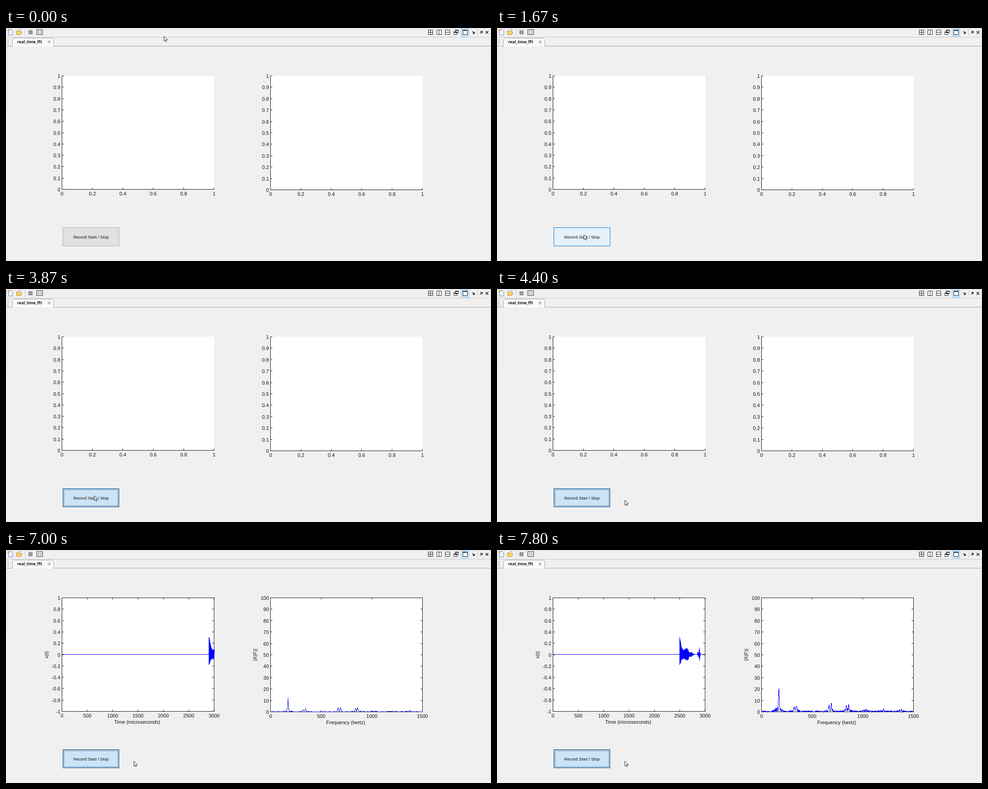
Write an HTML page that moves like this. It is 1079 px wide and 519 px high and loops after 8 s.

```html
<!DOCTYPE html>
<html lang="en">
<head>
<meta charset="utf-8">
<title>real_time_fft</title>
<style>
html, body { margin: 0; width: 100%; height: 100%; overflow: hidden; background: #f0f0f0; }
svg { display: block; width: 100%; height: 100%; }
text { font: 11px "Liberation Sans", Arial, sans-serif; fill: #111; }
.crisp { shape-rendering: crispEdges; }
.line { fill: none; stroke: #111; }
.plot { fill: none; stroke: #00f; shape-rendering: crispEdges; }
</style>
</head>
<body>
<svg id="stage" viewBox="0 0 1079 519">
  <defs>
    <path id="pane" d="M0 0h10v10h-10z"/>
    <path id="arrow" d="M-2.5 -2.5L2 2M2.2 -1.8V2.2H-1.8"/>
    <path id="cross" d="M-3 -3L3 3M3 -3L-3 3"/>
    <rect id="face" x="126.5" y="444.5" width="125" height="41"/>
  </defs>
  <rect width="1079" height="519" fill="#f0f0f0"/>
  <g class="crisp" fill="none">
    <path d="M0 .5H1079M.5 0V191M1078.5 0V519" stroke="#dcdcdc"/>
    <path d="M0 20.5H1079" stroke="#c4c4c4"/>
    <path d="M0 40.5H1079" stroke="#a0a0a0"/>
    <path d="M42.5 2V18M1049.5 2V18M3.5 24V38M5.5 24V38" stroke="#c8c8c8"/>
  </g>
  <path d="M14.5 41V26L18 22.5H102L106 26V41" fill="#fafafa" stroke="#a0a0a0"/>
  <text x="25" y="34" style="font:bold 8.8px 'Open Sans',sans-serif">real_time_fft</text>
  <use href="#cross" x="96" y="31" stroke="#b4b4b4" stroke-width="2"/>

  <path d="M5.5 3.5H12L15 6.5V15.5H5.5Z" fill="#eef6ff" stroke="#5f86b5"/>
  <circle cx="5.5" cy="4.5" r="2.3" fill="#eda23c"/>
  <path d="M23.5 14.5V6H28L29.5 7.5H33V9H35.5L33 14.5Z" fill="#f7d56b" stroke="#b88a2c"/>
  <path d="M29 4.5Q32 1.5 34.5 4.5" fill="none" stroke="#5079b0"/>
  <g class="crisp">
    <rect x="50.5" y="5.5" width="8" height="8" fill="#9c9c9c" stroke="#858585"/>
    <rect x="68.5" y="3.5" width="13" height="11" fill="#fff" stroke="#222"/>
    <rect x="71.5" y="6.5" width="7" height="5" fill="#f4f4f4" stroke="#777"/>
    <rect x="1012.5" y=".5" width="17" height="18" fill="#c6e3fa" stroke="#9accf3"/>
    <g stroke="#222" fill="#fff">
      <use href="#pane" x="939.5" y="4.5"/>
      <use href="#pane" x="958.5" y="4.5"/>
      <use href="#pane" x="977.5" y="4.5"/>
      <path d="M944.5 4.5v10M939.5 9.5h10M963.5 4.5v10M977.5 9.5h10"/>
      <path d="M999.5 4.5h7v6h-7zm0 1h7M996.5 8.5h7v6h-7zm0 1h7"/>
      <use href="#pane" x="1016.5" y="4.5"/>
      <path d="M1016 5.5h11"/>
    </g>
  </g>
  <g fill="none" stroke="#222" stroke-width="1.5">
    <use href="#arrow" transform="translate(1040 10)"/>
    <use href="#arrow" transform="translate(1057.3 9.7) rotate(-90)"/>
    <use href="#cross" x="1070" y="9.7"/>
  </g>

  <g id="empty"></g>
  <g id="live"></g>
  <path id="wave" class="plot"/>
  <path id="spectrum" class="plot"/>

  <g class="crisp">
    <use href="#face" fill="#e1e1e1" stroke="#adadad"/>
    <use href="#face" id="hover" fill="#e5f1fb" stroke="#0078d7"/>
    <g id="press" fill="none">
      <use href="#face" fill="#cce4f7" stroke="#3a72a4"/>
      <rect x="127.5" y="445.5" width="123" height="39" stroke="#5f97c8"/>
      <rect x="129.5" y="447.5" width="119" height="35" stroke="#555" stroke-dasharray="1 1"/>
    </g>
  </g>
  <text x="189" y="469.3" text-anchor="middle" style="font-size:9.25px">Record Start / Stop</text>
  <path id="cursor" d="M.5 .5V11.2L3 8.9L4.7 12.7L6.4 12L4.7 8.3H8.2Z" fill="#fff" stroke="#111" stroke-width=".9"/>
</svg>
<script>
const $ = id => document.getElementById(id);
const LOOP = 8000, STEP = 1000 / 15;
const LEFT = { x: 124.5, y: 106.5, w: 338.5, h: 253 };
const RIGHT = { x: 588.5, y: 106.5, w: 338, h: 254 };
const ZERO = 232.5;

const clamp = v => Math.max(0, Math.min(1, v));
const mix = (a, b, p) => a + (b - a) * p;
const ease = p => p * p * (3 - 2 * p);
const bell = (x, center, width) => Math.exp(-(((x - center) / width) ** 2));
const fall = (x, edge, width) => 1 / (1 + Math.exp((x - edge) / width));
const rand = (i, seed) => {
  const v = Math.sin(i * 127.1 + seed * 311.7) * 43758.5453;
  return v - Math.floor(v);
};
const range = (from, to, step) =>
  Array.from({ length: Math.round((to - from) / step) + 1 }, (_, i) => +(from + i * step).toFixed(1));

function axes({ x, y, w, h }, xs, ys, boxed) {
  const bottom = y + h, right = x + w;
  let d = `M${x} ${y}V${bottom}H${right}` + (boxed ? `V${y}H${x}` : ""), labels = "";
  xs.forEach((v, i) => {
    const tx = x + w * i / (xs.length - 1);
    d += `M${tx} ${bottom}v-4` + (boxed ? `M${tx} ${y}v4` : "");
    labels += `<text x="${tx}" y="${bottom + 13.7}" text-anchor="middle">${v}</text>`;
  });
  ys.forEach((v, i) => {
    const ty = Math.floor(bottom - h * i / (ys.length - 1)) + .5;
    d += `M${x} ${ty}h4` + (boxed ? `M${right} ${ty}h-4` : "");
    labels += `<text x="${x - 3.7}" y="${ty + 4}" text-anchor="end">${v}</text>`;
  });
  return `<rect class="crisp" x="${x}" y="${y - .5}" width="${w}" height="${h}" fill="#fff"/>
    <path class="line" d="${d}"/>${labels}`;
}

function titles({ x, y, w, h }, xName, yName) {
  return `<text x="${x + w / 2 - 1.8}" y="${y + h + 27.6}" text-anchor="middle">${xName}</text>
    <text transform="translate(${x - 31} 233.5) rotate(-90)" text-anchor="middle">${yName}</text>`;
}

const unit = range(0, 1, .2), tenths = range(0, 1, .1);
$("empty").innerHTML = axes(LEFT, unit, tenths) + axes(RIGHT, unit, tenths);
$("live").innerHTML =
  axes(LEFT, range(0, 3000, 500), range(-1, 1, .2), true) +
  titles(LEFT, "Time (microseconds)", "x(t)") +
  axes(RIGHT, range(0, 1500, 500), range(0, 100, 10), true) +
  titles(RIGHT, "Frequency (hertz)", "|X(F)|");

// Loudness after the onset: sharp attack, sustained body, tail, second short burst.
const loudness = (u, attack) =>
  attack * Math.exp(-((u / 4) ** 1.5)) + 10 * fall(u, 20.5, .6) + 5 * bell(u, 16, 4) +
  6 * bell(u, 25, 5) + 8 * bell(u, 41, 1) + 17 * bell(u, 44.2, 1.3);

function wavePath(shift) {
  const right = LEFT.x + LEFT.w;
  if (shift < 0) return `M${LEFT.x} ${ZERO}H${right}`;
  const onset = 451.5 - 11.3 * shift;
  let d = `M${LEFT.x} ${ZERO}H${onset}`;
  for (let i = 0, x; (x = onset + i / 2) <= right; i++) {
    const swing = i % 2 ? -loudness(i / 2, 30) : loudness(i / 2, 13);
    d += `L${x} ${(ZERO + swing * mix(i < 8 ? 1 : .75, 1, rand(i, 3))).toFixed(1)}`;
  }
  return d + `L${right} ${ZERO}`;
}

// Harmonics of one pitch; the upper ones carry a smaller peak just below.
const PITCH = 38.8;
const HARMONICS = [39, 9, 0, 13, 11, 2, 2, 2];

function level(x, p, noise) {
  let v = noise * mix(.8, 2.2, p);
  HARMONICS.forEach((height, i) => {
    const center = PITCH * (i + 1), gain = mix(.83, 1.25, p);
    const side = i ? .6 * bell(x, center - 5, 1.7) : 0;
    v += gain * height * (bell(x, center, 1.2) + side);
    v += noise * Math.sqrt(height) * mix(.5, 1.4, p) * bell(x, center - 2, 10);
  });
  return v;
}

function spectrumPath(stage) {
  const base = RIGHT.y + RIGHT.h;
  if (!stage) return `M${RIGHT.x} ${base}h${RIGHT.w}`;
  const p = clamp((stage - 2) / 4), step = mix(1.5, .5, p);
  let d = "";
  for (let i = 0; i * step <= RIGHT.w; i++) {
    const x = i * step, noise = rand(i, stage) ** 1.5;
    const v = stage < 2 ? noise * .8 : level(x, p, noise);
    d += `${i ? "L" : "M"}${(RIGHT.x + x).toFixed(1)} ${(base - v).toFixed(1)}`;
  }
  return d;
}

const UPDATES = [83, 87, 105, 108, 111, 115, 117];
const plots = UPDATES.map((_, stage) => [wavePath(stage - 2), spectrumPath(stage)]);

function pointer(tick) {
  const go = (from, to) => ease(clamp((tick - from) / (to - from)));
  const approach = go(10, 20), settle = go(20, 23), leave = go(57, 66);
  return [
    351 - 151 * approach - 7 * settle + 91 * leave,
    18 + 414 * approach + 28 * settle + 10 * leave
  ].map(Math.round);
}

function draw(t) {
  const tick = Math.floor((t + 4) / STEP);
  $("cursor").setAttribute("transform", `translate(${pointer(tick)})`);
  $("hover").setAttribute("opacity", clamp((tick - 21) / 4));
  $("press").setAttribute("opacity", clamp((tick - 26) / 4));

  const stage = UPDATES.filter(u => u <= tick).length - 1;
  const [wave, spectrum] = plots[stage] || ["", ""];
  $("empty").style.display = stage < 0 ? "" : "none";
  $("live").style.display = stage < 0 ? "none" : "";
  $("wave").setAttribute("d", wave);
  $("spectrum").setAttribute("d", spectrum);
}

const start = performance.now();
function loop() {
  draw((performance.now() - start) % LOOP);
  requestAnimationFrame(loop);
}
loop();
</script>
</body>
</html>
```
